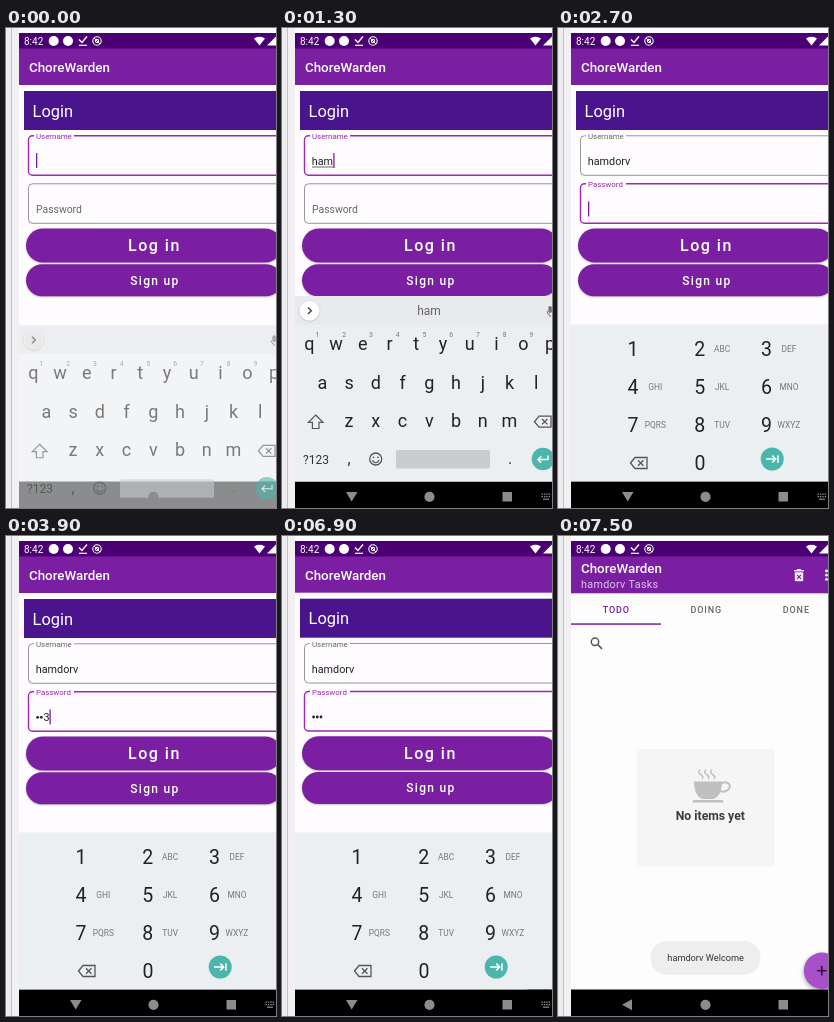
An HTML page with a canvas that plays this animation: 270 by 480 pixels, repeating every 8000 ms.

```html
<!DOCTYPE html>
<html lang="en">
<head>
<meta charset="utf-8">
<title>Login demo</title>
<style>
html, body { margin: 0; width: 100%; height: 100%; overflow: hidden; background: #fff; }
canvas { display: block; width: 270px; height: 480px; }
</style>
</head>
<body>
<canvas id="stage"></canvas>
<script>
const W = 270, H = 480, LOOP = 8000;
const APP = 'ChoreWarden', USER = 'hamdorv';
const PURPLE = '#7b1fa2', DEEP = '#4a148c', ACCENT = '#9c27b0', TEAL = '#4db6ac', PANEL = '#eceff1';
const canvas = document.getElementById('stage');
const c = canvas.getContext('2d');
const dpr = window.devicePixelRatio || 1;
canvas.width = W * dpr;
canvas.height = H * dpr;

const clamp = (v) => Math.max(0, Math.min(1, v));
const span = (t, a, b) => clamp((t - a) / (b - a));
const lerp = (a, b, k) => a + (b - a) * k;
const easeOut = (k) => 1 - (1 - k) ** 3;
const smooth = (k) => k * k * (3 - 2 * k);

function text(s, x, y, size, color, { weight = 400, align = 'left', gap = 0 } = {}) {
  c.font = `${weight} ${size}px Roboto, sans-serif`;
  c.letterSpacing = gap + 'px';
  c.textAlign = align;
  c.fillStyle = color;
  c.fillText(s, x, y);
  return c.measureText(s).width;
}
function rect(x, y, w, h, color) {
  c.fillStyle = color;
  c.fillRect(x, y, w, h);
}
function round(x, y, w, h, r, color) {
  c.fillStyle = color;
  c.beginPath();
  c.roundRect(x, y, w, h, r);
  c.fill();
}
function disc(x, y, r, color) {
  c.fillStyle = color;
  c.beginPath();
  c.arc(x, y, r, 0, 7);
  c.fill();
}
function ring(x, y, r, color, width = 1.2) {
  c.strokeStyle = color;
  c.lineWidth = width;
  c.beginPath();
  c.arc(x, y, r, 0, 7);
  c.stroke();
}
function path(points, close) {
  c.beginPath();
  points.forEach(([x, y]) => c.lineTo(x, y));
  if (close) c.closePath();
}
function line(color, width, ...points) {
  path(points);
  c.strokeStyle = color;
  c.lineWidth = width;
  c.stroke();
}
function poly(color, ...points) {
  path(points, true);
  c.fillStyle = color;
  c.fill();
}
function layer(draw, { dy = 0, alpha = 1, clip } = {}) {
  c.save();
  if (clip) {
    c.beginPath();
    c.rect(...clip);
    c.clip();
  }
  c.translate(0, dy);
  c.globalAlpha *= alpha;
  draw();
  c.restore();
}
function shadowed(blur, dy, alpha, draw) {
  c.save();
  c.shadowColor = `rgba(0,0,0,${alpha})`;
  c.shadowBlur = blur * dpr;
  c.shadowOffsetY = dy * dpr;
  draw();
  c.restore();
}

function backdrop() {
  rect(0, 0, W, H, '#ffffff');
  rect(0, 0, 5, H, '#ededef');
  rect(5, 0, 1, H, '#c2c2c5');
  rect(6, 0, 7, H, '#f2f0f3');
  rect(13, 5, 257, 475, '#fefcfe');
}

function statusBar() {
  rect(13, 5, 257, 15.5, '#4a0072');
  text('8:42', 18, 16.8, 10, '#fff');
  disc(47.7, 13, 5, '#fff');
  disc(62, 13, 5, '#fff');
  line('#fff', 1.4, [73, 11.5], [76, 14.5], [81, 8.5]);
  line('#fff', 1.2, [73, 17.3], [81, 17.3]);
  ring(91, 13, 4.2, '#fff', 1.1);
  ring(91, 13, 1.6, '#fff', 1.1);
  line('#fff', 1, [88, 10], [94, 16]);
  poly('#fff', [248, 10.5], [251, 9], [253.5, 8.7], [256, 9], [259, 10.5], [253.5, 17.5]);
  poly('#fff', [270, 8.5], [270, 17.5], [261, 17.5]);
}

function navBar(keyboardUp) {
  const gray = '#8c8c8c';
  if (keyboardUp) poly(gray, [64, 464], [75.5, 464], [69.7, 473.5]);
  else poly(gray, [74, 463.2], [74, 474.2], [64, 468.7]);
  disc(147.5, 468.8, 5.1, gray);
  rect(220.5, 464, 9.5, 9.5, gray);
  if (keyboardUp) {
    for (let i = 0; i < 4; i++) {
      rect(259.5 + i * 2.4, 465.5, 1.4, 1.3, gray);
      rect(259.5 + i * 2.4, 468, 1.4, 1.3, gray);
    }
    rect(261, 470.6, 6, 1.2, gray);
  }
}

function field(y, focused, label, floated) {
  const color = focused ? ACCENT : '#8b8b8b';
  c.strokeStyle = color;
  c.lineWidth = focused ? 1.4 : 0.9;
  c.beginPath();
  c.roundRect(22.5, y, 253, 39.5, 4);
  c.stroke();
  if (floated > 0) rect(28, y - 2, 40 * floated, 4, '#fefcfe');
  text(label, 30, lerp(y + 29.3, y + 3.2, floated), lerp(10.4, 7.9, floated), focused ? ACCENT : '#666');
}

const caret = (x, y) => rect(x, y, 1.3, 15, '#7b1fa2');

function button(label, x, y, h, size, base, gap) {
  shadowed(2, 0.8, 0.25, () => round(20, y, 256, h, h / 2, PURPLE));
  text(label, x, base, size, '#fff', { weight: 500, gap });
}

const KEY_TIMES = [1000, 1200, 1300, 1500, 1700, 1900, 2100];
const typed = (t) => USER.slice(0, KEY_TIMES.filter((k) => t >= k).length);

function loginForm(t) {
  const onPassword = t >= 2400;
  rect(18, 63, 252, 39, DEEP);
  text('Login', 26.6, 88.8, 16.4, '#fff');

  field(107.8, !onPassword, 'Username', 1);
  const name = typed(t);
  const width = text(name, 29.8, 137, 10.8, '#222');
  if (!onPassword) {
    if (name) rect(30, 138.6, width, 0.8, '#444');
    if (t < 500 || t >= 1000) caret(30 + width, 125);
  }

  field(155.8, onPassword, 'Password', smooth(span(t, 2400, 2570)));
  if (onPassword) password(t);

  button('Log in', 122, 200.5, 34, 16, 223.4, 1.5);
  button('Sign up', 124.3, 236.3, 32, 12, 256.8, 1.3);
}

function password(t) {
  const dots = t >= 5400 ? 3 : t >= 3900 ? 2 : t >= 3600 ? 1 : 0;
  const digit = t >= 5400 || t < 3300 ? '' : String(dots + 1);
  for (let i = 0; i < dots; i++) disc(31.6 + i * 3.7, 181.3, 1.4, '#222');
  let x = 30 + dots * 3.7;
  if (digit) x += text(digit, x, 185, 10.8, '#222');
  const flips = [2400, 2900, 3300, 4400, 4900, 5400, 5900, 6900];
  if (flips.filter((f) => t >= f).length % 2) caret(x, 173.5);
}

function loginBar() {
  rect(13, 20, 257, 37, PURPLE);
  text(APP, 23, 44, 13.35, '#fff', { weight: 500 });
}

function backspace(x, y) {
  const k = '#555';
  path([[x - 8.5, y], [x - 4, y - 5.5], [x + 8, y - 5.5], [x + 8, y + 5.5], [x - 4, y + 5.5]], true);
  c.strokeStyle = k;
  c.lineWidth = 1.3;
  c.stroke();
  line(k, 1.3, [x - 1, y - 2.7], [x + 4.4, y + 2.7]);
  line(k, 1.3, [x + 4.4, y - 2.7], [x - 1, y + 2.7]);
}

function letterKeys(t) {
  rect(13, 268, 257, 212, PANEL);
  rect(13, 268, 257, 28.5, '#e8eaed');
  shadowed(2, 0.6, 0.25, () => disc(27.5, 282.7, 10, '#fff'));
  line('#444', 1.4, [26, 279.5], [29.3, 282.7], [26, 285.9]);
  round(266.3, 278, 3.6, 7, 1.8, '#777');
  line('#777', 1, [265, 283], [266, 286], [268, 287], [268, 289]);
  text(typed(t), 147, 286.6, 12, '#666', { align: 'center' });

  const row = (keys, x, y) => [...keys].forEach((k, i) =>
    text(k, x + i * 26.75, y, 18, '#222', { align: 'center' }));
  row('qwertyuiop', 27.3, 322);
  row('asdfghjkl', 40.3, 360.5);
  row('zxcvbnm', 67, 399.2);
  for (let i = 0; i < 9; i++) text(i + 1, 35.5 + i * 26.75, 308.8, 6.8, '#777', { align: 'center' });

  path([[33.7, 387], [41, 394.3], [37, 394.3], [37, 400.5], [30.4, 400.5], [30.4, 394.3], [26.4, 394.3]], true);
  c.strokeStyle = '#555';
  c.lineWidth = 1.2;
  c.stroke();
  backspace(261, 393.7);

  text('?123', 34, 435.5, 12, '#333', { align: 'center' });
  text(',', 67, 436, 16, '#333', { align: 'center' });
  ring(93.7, 431, 6, '#555', 1.3);
  disc(91.5, 429.3, 0.9, '#555');
  disc(95.9, 429.3, 0.9, '#555');
  c.beginPath();
  c.arc(93.7, 431.4, 3.2, 0.2, Math.PI - 0.2);
  c.stroke();
  round(114, 422, 94, 18.5, 1.5, '#c9cbcd');
  text('.', 228, 436, 16, '#333', { align: 'center' });
  disc(261, 431, 11.3, TEAL);
  line('#fff', 1.5, [266, 427.5], [266, 431.5], [256, 431.5]);
  line('#fff', 1.5, [259.2, 428.3], [256, 431.5], [259.2, 434.7]);
}

function numberKeys() {
  rect(13, 296.5, 257, 157, PANEL);
  const letters = ['', 'ABC', 'DEF', 'GHI', 'JKL', 'MNO', 'PQRS', 'TUV', 'WXYZ'];
  letters.forEach((s, i) => {
    const x = 75 + (i % 3) * 66.8, y = 327.6 + Math.floor(i / 3) * 38;
    text(i + 1, x, y, 19.5, '#222', { align: 'center' });
    text(s, x + 22.3, y - 4, 8.4, '#777', { align: 'center' });
  });
  backspace(81, 435);
  text('0', 142, 441.6, 19.5, '#222', { align: 'center' });
  disc(214.2, 431, 11.5, TEAL);
  line('#fff', 1.5, [208, 431], [217.5, 431]);
  line('#fff', 1.5, [214.3, 427.6], [217.7, 431], [214.3, 434.4]);
  line('#fff', 1.5, [220, 427.2], [220, 434.8]);
}

function taskScreen() {
  rect(13, 20, 257, 434, '#fefdfe');
  rect(13, 20, 257, 37.3, PURPLE);
  text(APP, 23, 37, 13.35, '#fff', { weight: 500 });
  text(USER + ' Tasks', 23, 51.6, 10.8, '#dcc3e6', { gap: 0.3 });

  const bin = '#f3e8f6';
  rect(236, 34, 10, 1.5, bin);
  rect(239, 33, 4, 1.5, bin);
  round(236.8, 36.3, 8.4, 9, 1, bin);
  line(PURPLE, 1.1, [239, 38.8], [243, 42.8]);
  line(PURPLE, 1.1, [243, 38.8], [239, 42.8]);
  for (let i = 0; i < 3; i++) disc(268.5, 35 + i * 4.2, 1.4, '#fff');

  ['TODO', 'DOING', 'DONE'].forEach((s, i) =>
    text(s, 58.3 + i * 90, 76.5, 9, i ? '#666' : PURPLE, { weight: 500, align: 'center', gap: 0.9 }));
  rect(13, 87.3, 90, 1.5, PURPLE);

  ring(37, 105.8, 3.7, '#555', 1.5);
  line('#555', 1.7, [39.7, 108.5], [44, 112.8]);

  rect(79, 213, 137.5, 117.5, '#f5f5f5');
  cup();
  text('No items yet', 152.3, 284, 12.2, '#3c3c3c', { weight: 700, align: 'center' });

  shadowed(5, 2, 0.35, () => disc(264, 434.7, 18.2, '#a84fcb'));
  line('#241030', 1.5, [259, 434.7], [268.5, 434.7]);
  line('#241030', 1.5, [263.8, 430], [263.8, 439.4]);
}

function cup() {
  const gray = '#c0c0c0';
  c.fillStyle = gray;
  c.beginPath();
  c.moveTo(136, 245.5);
  c.lineTo(164, 245.5);
  c.bezierCurveTo(164, 256, 160, 262, 155, 263);
  c.lineTo(144, 263);
  c.bezierCurveTo(139, 261, 136, 255, 136, 245.5);
  c.fill();
  c.beginPath();
  c.ellipse(166, 251, 6, 4.5, -0.3, 0, 7);
  c.strokeStyle = gray;
  c.lineWidth = 2;
  c.stroke();
  round(134.5, 264, 31, 2.6, 1.3, gray);
  c.lineWidth = 1.5;
  for (let i = 0; i < 3; i++) {
    const x = 142 + i * 6;
    c.beginPath();
    c.moveTo(x + 2, 243);
    c.bezierCurveTo(x + 6, 239, x - 5, 238, x, 233.5);
    c.stroke();
  }
}

function toast() {
  shadowed(2, 0.6, 0.12, () => round(93.3, 405.3, 108.5, 32, 15.5, '#eeeeef'));
  text(USER + ' Welcome', 147.6, 424.9, 9.2, '#333', { align: 'center' });
}

function draw(t) {
  c.setTransform(dpr, 0, 0, dpr, 0, 0);
  c.lineJoin = 'miter';
  backdrop();

  const open = smooth(span(t, 6850, 7300));
  const screen = [13, 20, 257, 434];
  if (open < 1) {
    layer(() => loginForm(t), { dy: -8.5 * open, clip: screen });
    layer(loginBar, { dy: -8.5 * open, clip: screen });
  }
  if (open > 0) {
    const top = lerp(454, 20, open);
    if (open > 0.03) layer(taskScreen, { dy: 18 * (1 - open), clip: [13, top, 257, 454 - top] });
  }
  statusBar();
  rect(13, 453.5, 257, 26.5, '#000');

  if (t < 2500) {
    const k = easeOut(span(t, 0, 350));
    layer(() => letterKeys(t), { dy: 29.5 * (1 - k), alpha: lerp(0.58, 1, k), clip: [13, 268, 257, k < 1 ? 212 : 185.5] });
  } else if (t < 7200) {
    const k = span(t, 6980, 7180);
    layer(numberKeys, { dy: 60 * k * k, alpha: 1 - k, clip: [13, 296, 257, 157.5] });
  }
  const toastIn = span(t, 7150, 7400);
  if (toastIn > 0) layer(toast, { alpha: toastIn });
  navBar(t >= 100 && t < 7100);
}

const start = performance.now();
function tick() {
  draw((performance.now() - start) % LOOP);
  requestAnimationFrame(tick);
}
tick();
</script>
</body>
</html>
```
